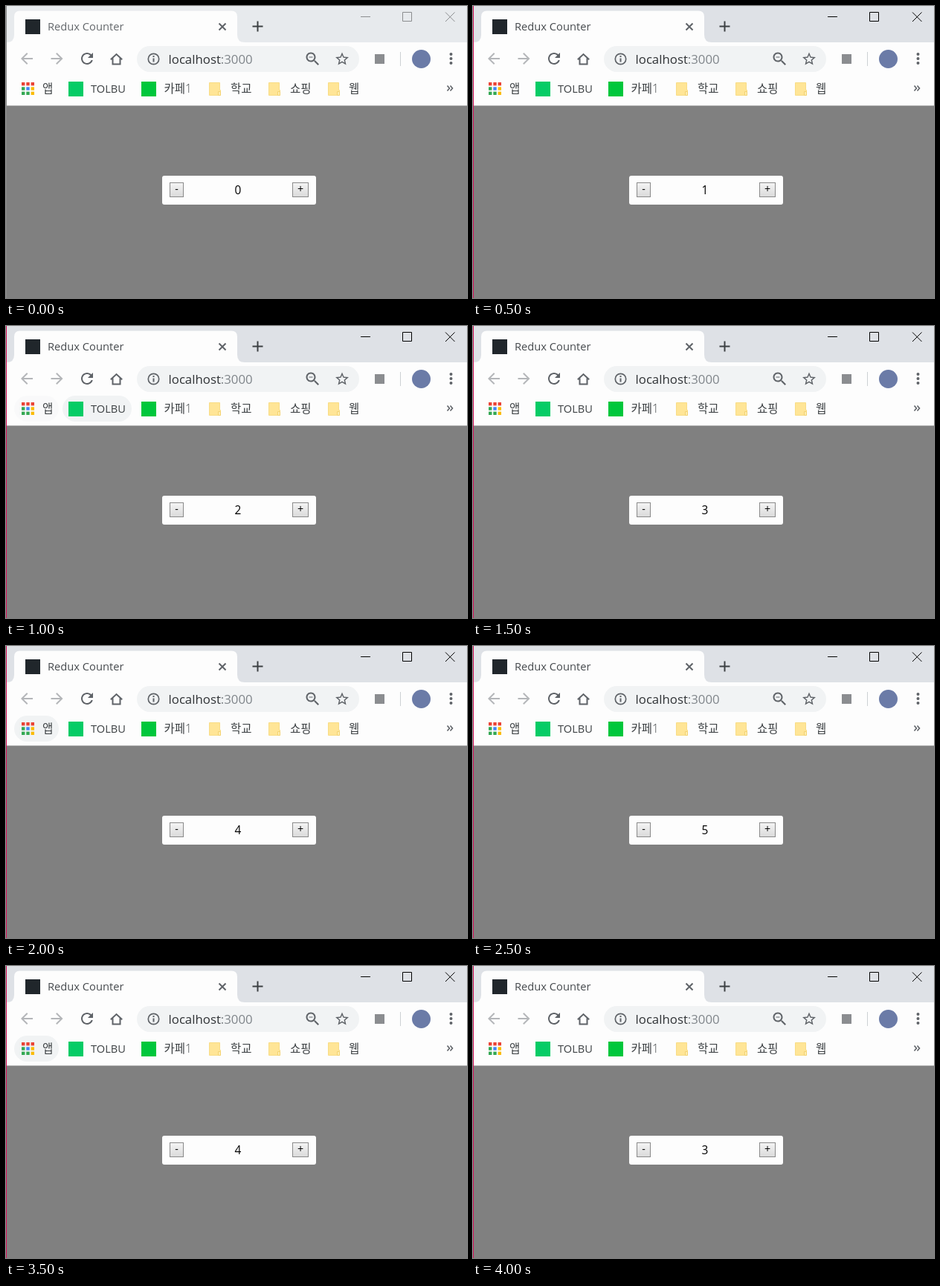
An HTML page that plays this animation: 620x394 px, repeating every 4500 ms.

```html
<!DOCTYPE html>
<html lang="ko">
<head>
<meta charset="utf-8">
<title>Redux Counter</title>
<style>
  html, body { margin: 0; width: 100%; height: 100%; overflow: hidden; background: #808080; }
  svg { display: block; }
  text { font-family: "Open Sans", "Noto Sans CJK KR", "Noto Sans CJK", sans-serif; }
  .marks text { font-size: 14.6px; fill: #3c4043; }
  .marks .ko { font-size: 15.5px; font-weight: 300; }
  .line { fill: none; stroke: #5f6368; stroke-width: 2; }
  .thin { stroke-width: 1.6; }
  .off { fill: #b4b6b9; }
  .solid { fill: #5f6368; }
  .paper { fill: #fdfdfd; }
  .pill { fill: #f1f3f4; }
  .btn { fill: url(#face); stroke: #8a8a8a; }
  .sign { font-size: 14.2px; text-anchor: middle; }
  .count text { font-size: 15.4px; text-anchor: middle; }

  .frame, .controls, .title, .edge, .count, .hoverSite, .hoverApps {
    animation: 4500ms step-end infinite;
  }
  .frame { fill: #dee1e6; animation-name: frame; }
  .controls { fill: none; stroke: #000; animation-name: controls; }
  .title { font-size: 14.7px; fill: #45494d; animation-name: title; }
  .edge { fill: #d4145a; animation-name: edge; }
  .count { animation-name: count; }
  .hoverSite { opacity: 0; animation-name: site; }
  .hoverApps { opacity: 0; animation-name: apps; }

  @keyframes frame { 0% { fill: #e7eaed; } 11.111%, 100% { fill: #dee1e6; } }
  @keyframes controls { 0% { stroke: #8b8d8f; } 11.111%, 100% { stroke: #000; } }
  @keyframes title { 0% { fill: #63676b; } 11.111%, 100% { fill: #45494d; } }
  @keyframes edge { 0% { fill: #8c8c8c; } 11.111%, 100% { fill: #d4145a; } }
  @keyframes site { 0% { opacity: 0; } 22.222% { opacity: 1; } 33.333%, 100% { opacity: 0; } }
  @keyframes apps {
    0% { opacity: 0; }
    22.222% { opacity: .3; }
    33.333% { opacity: 0; }
    44.444% { opacity: 1; }
    55.555% { opacity: 0; }
    77.777% { opacity: 1; }
    88.888%, 100% { opacity: 0; }
  }
  /* one digit per 30px row */
  @keyframes count {
    0% { transform: translateY(0); }
    11.111% { transform: translateY(-30px); }
    22.222% { transform: translateY(-60px); }
    33.333% { transform: translateY(-90px); }
    44.444% { transform: translateY(-120px); }
    55.555% { transform: translateY(-150px); }
    77.777% { transform: translateY(-120px); }
    88.888%, 100% { transform: translateY(-90px); }
  }
</style>
</head>
<body>
<svg width="620" height="394" viewBox="0 0 620 394">
  <defs>
    <linearGradient id="face" x2="0" y2="1">
      <stop stop-color="#f4f4f4"/><stop offset="1" stop-color="#dadada"/>
    </linearGradient>
    <clipPath id="slot"><rect x="300" y="234" width="24" height="29"/></clipPath>
    <g id="folder">
      <path d="M.5 .5H14.5V10.5H15.5V17.5H.5Z" fill="#ffe596" stroke="#f8dc85"/>
      <path d="M12.5 17.5V12.5H15.5V17.5Z" fill="#ffeeb0" stroke="#f3d273"/>
    </g>
    <path id="dot" d="M0 0h4.4v4.4H0z"/>
  </defs>

  <!-- title bar -->
  <rect class="frame" width="620" height="49"/>
  <path class="paper" d="M1 49Q11 49 11 39V14.5Q11 6.5 19 6.5H303Q311 6.5 311 14.5V39Q311 49 321 49Z"/>
  <rect x="26" y="18" width="20" height="20" fill="#20262b"/>
  <text class="title" x="56" y="33">Redux Counter</text>
  <path class="line" d="M286.5 23.5l9 9m0-9l-9 9"/>
  <path class="line" style="stroke:#3c4043" d="M331.5 27.5h14m-7-7v14"/>
  <path class="controls" d="M477 14.5h13M533.5 8.5h12v12h-12ZM591 8.5l12.5 12.5m0-12.5L591 21"/>

  <!-- toolbar -->
  <rect class="paper" y="49" width="620" height="85"/>
  <path class="off" transform="translate(16 59)" d="M20 11H7.83l5.59-5.59L12 4l-8 8 8 8 1.41-1.41L7.83 13H20z"/>
  <path class="off" transform="translate(56.5 59)" d="M12 4l-1.41 1.41L16.17 11H4v2h12.17l-5.58 5.59L12 20l8-8z"/>
  <path class="solid" transform="translate(97 59)" d="M17.65 6.35C16.2 4.9 14.21 4 12 4c-4.42 0-7.99 3.58-7.99 8s3.57 8 7.99 8c3.73 0 6.84-2.55 7.73-6h-2.08c-.82 2.33-3.04 4-5.65 4-3.31 0-6-2.69-6-6s2.69-6 6-6c1.66 0 3.14.69 4.22 1.78L13 11h7V4z"/>
  <path class="line" d="M140.8 72.2l7.7-7.2 7.7 7.2M143.5 70.5v8h10v-8"/>
  <rect class="pill" x="176" y="54" width="299" height="35" rx="17.5"/>
  <g class="line">
    <circle cx="198.5" cy="71.5" r="7.2" stroke-width="1.7"/>
    <path d="M198.5 70.5v5M198.5 67v2"/>
  </g>
  <path class="solid" transform="translate(400.5 59.5)" d="M15.5 14h-.79l-.28-.27C15.41 12.59 16 11.11 16 9.5 16 5.91 13.09 3 9.5 3S3 5.91 3 9.5 5.91 16 9.5 16c1.61 0 3.09-.59 4.23-1.57l.27.28v.79l5 4.99L20.49 19zm-6 0C7.01 14 5 11.99 5 9.5S7.01 5 9.5 5 14 7.01 14 9.5 11.99 14 9.5 14zM7 9h5v1H7z"/>
  <path class="solid" transform="translate(441.2 60.7) scale(.9)" d="M22 9.24l-7.19-.62L12 2 9.19 8.63 2 9.24l5.46 4.73L5.82 21 12 17.27 18.18 21l-1.63-7.03zM12 15.4l-3.76 2.27 1-4.28-3.32-2.88 4.38-.38L12 6.1l1.71 4.04 4.38.38-3.32 2.88 1 4.28z"/>
  <text x="218.5" y="78" font-size="16.8" fill="#303336">localhost<tspan fill="#80868b">:3000</tspan></text>
  <rect x="496" y="65" width="13" height="13" fill="#8b8d90"/>
  <path d="M530.5 62v19" stroke="#cdd0d3"/>
  <circle cx="558.5" cy="71.5" r="12.5" fill="#6b7ba7"/>
  <g class="solid">
    <circle cx="598.5" cy="65" r="2"/><circle cx="598.5" cy="71" r="2"/><circle cx="598.5" cy="77" r="2"/>
  </g>

  <!-- bookmarks -->
  <g class="marks">
    <rect class="pill hoverApps" x="11" y="94" width="60" height="35" rx="17.5"/>
    <rect class="pill hoverSite" x="76" y="94" width="93" height="35" rx="17.5"/>
    <g transform="translate(21 103)">
      <g fill="#ea4335"><use href="#dot"/><use href="#dot" x="6.3"/><use href="#dot" x="12.6"/></g>
      <g fill="#34a853"><use href="#dot" y="6.3"/><use href="#dot" y="12.6"/><use href="#dot" x="6.3" y="12.6"/></g>
      <use href="#dot" x="6.3" y="6.3" fill="#4285f4"/>
      <g fill="#fbbc05"><use href="#dot" x="12.6" y="6.3"/><use href="#dot" x="12.6" y="12.6"/></g>
    </g>
    <text class="ko" x="49" y="117">앱</text>
    <rect x="84" y="102" width="20" height="20" fill="#06cc66"/>
    <text x="114" y="117">TOLBU</text>
    <rect x="182" y="102" width="20" height="20" fill="#00c73c"/>
    <text class="ko" x="212.5" y="117">카페1</text>
    <use href="#folder" x="273" y="103"/>
    <text class="ko" x="302" y="117">학교</text>
    <use href="#folder" x="353" y="103"/>
    <text class="ko" x="382" y="117">쇼핑</text>
    <use href="#folder" x="433" y="103"/>
    <text class="ko" x="461" y="117">웹</text>
    <path class="line thin" d="M593.5 107.5l3 3.5-3 3.5m4-7l3 3.5-3 3.5"/>
  </g>

  <!-- page -->
  <rect y="134" width="620" height="260" fill="#808080"/>
  <rect y="134" width="620" height="1" fill="#b6b6b6"/>
  <rect class="paper" x="210" y="229" width="207" height="39" rx="3"/>
  <rect class="btn" x="220.5" y="238.5" width="18" height="19"/>
  <text class="sign" x="229.5" y="252">-</text>
  <rect class="btn" x="385.5" y="238.5" width="21" height="19"/>
  <text class="sign" x="396" y="252">+</text>
  <g clip-path="url(#slot)">
    <g class="count">
      <text x="312" y="254">0</text>
      <text x="312" y="284">1</text>
      <text x="312" y="314">2</text>
      <text x="312" y="344">3</text>
      <text x="312" y="374">4</text>
      <text x="312" y="404">5</text>
    </g>
  </g>
  <rect class="edge" width="1" height="394"/>
</svg>
</body>
</html>
```
